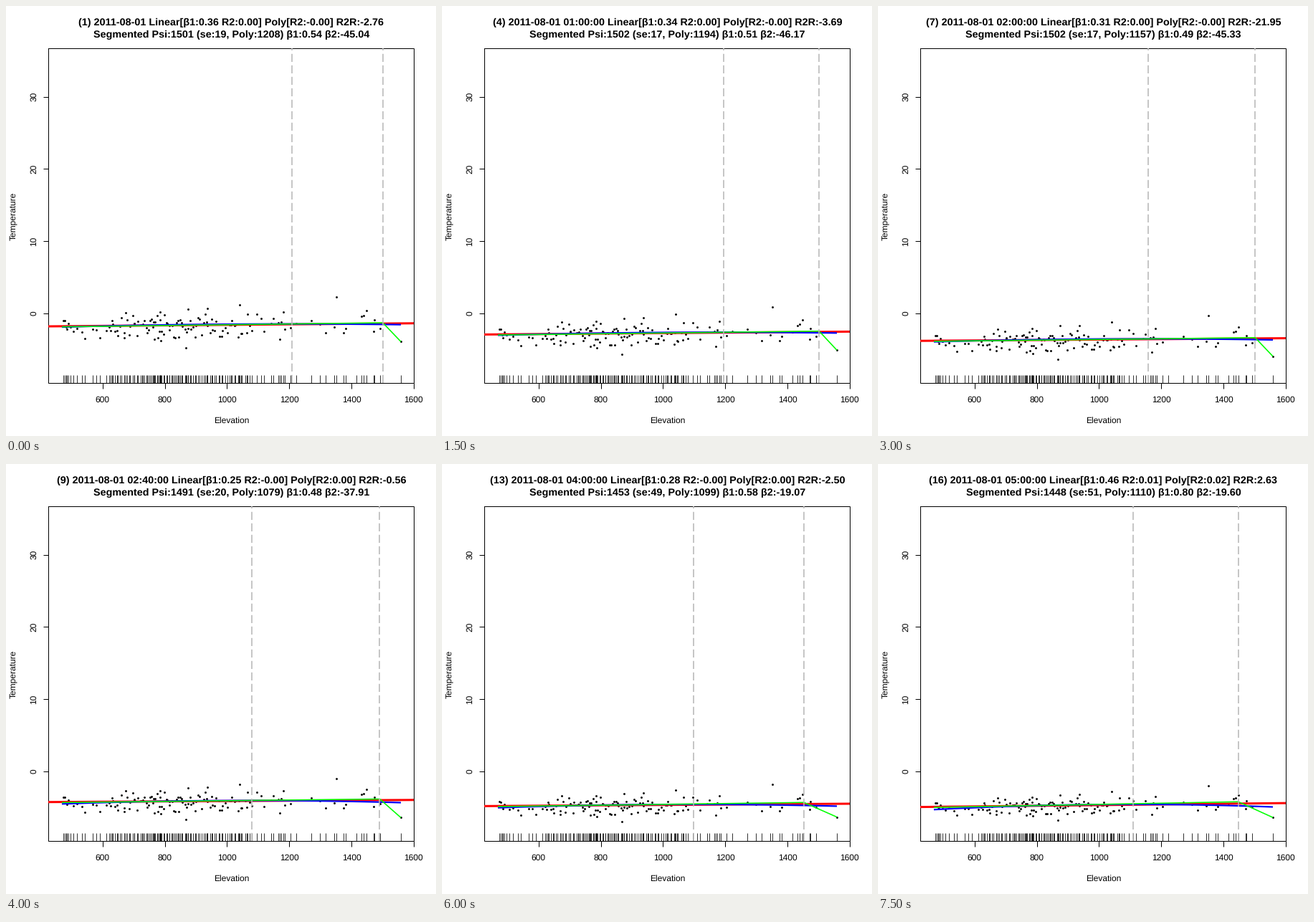
Write a matplotlib script that moves like this. It is 600 px wide and 600 px high and loops after 8 s.

```python
import numpy as np
import matplotlib.pyplot as plt
from matplotlib.animation import FuncAnimation

plt.rcParams["font.family"] = "Liberation Sans"
plt.rcParams["text.hinting"] = "none"

PX = 0.72                       # points per pixel at 100 dpi
L, R, T, B = 59, 569, 59, 526   # plot box in pixels
X_SCALE, Y_SCALE = 0.434, 10.08
X_MIN, X_MAX = 469, 1559        # elevation range of the stations
STEPS = 16

# title values at a few steps: step, slope, R2R, psi, se, peak, beta1, beta2
READINGS = np.array([
    [0, .36, -2.76, 1501, 19, 1208, .54, -45.04],
    [3, .34, -3.69, 1502, 17, 1194, .51, -46.17],
    [6, .31, -21.95, 1502, 17, 1157, .49, -45.33],
    [8, .25, -0.56, 1491, 20, 1079, .48, -37.91],
    [10, .19, 0.78, 1490, 20, 1069, .41, -36.00],
    [12, .28, -2.50, 1453, 49, 1099, .58, -19.07],
    [15, .46, 2.63, 1448, 51, 1110, .80, -19.60],
])

# stations far from the fit at the first step, in pixels
OUTLIERS = np.array([
    (110, 464), (167, 428), (207, 465), (215, 427), (216, 467), (251, 477),
    (254, 423), (281, 422), (326, 417), (382, 465), (387, 427), (461, 406),
    (471, 456), (499, 432), (503, 425), (513, 454),
])


def x_px(v):
    return 134.8 + (v - 600) * X_SCALE


def y_px(v):
    return 429 - v * Y_SCALE


def rise(slope, metres):
    """Pixels climbed for a slope in degrees per km."""
    return slope * metres / 1000 * Y_SCALE


def line_left(i):
    """The whole cloud cools and levels off: quadratic ease-out."""
    return 478.6 - 31.6 * (1 - i / (STEPS - 1)) ** 2


def fit_y(x, i, slope):
    return line_left(i) - rise(slope, (x - L) / X_SCALE)


# evenly jittered ranks mapped through the elevation distribution
rng = np.random.default_rng(5)
n = 124
rank = (np.arange(n) + rng.uniform(0, 1, n)) / n
core_x = np.round(np.interp(
    rank, [0, .05, .1, .27, .52, .67, .84, .92, 1],
    [78, 92, 140, 190, 247, 290, 342, 402, 530]))
core_res = np.clip(rng.normal(1, 8.5, n), -15, 17)

px = np.r_[core_x, OUTLIERS[:, 0], x_px(X_MAX)]
far_res = OUTLIERS[:, 1] - fit_y(OUTLIERS[:, 0], 0, READINGS[0, 1])
res = np.r_[core_res, far_res, 0]

fig = plt.figure(figsize=(6, 6), dpi=100, facecolor="white")
ax = fig.add_axes([0, 0, 1, 1])
ax.set_xlim(0, 600)
ax.set_ylim(600, 0)
ax.axis("off")


def stroke(xs, ys, color="black", width=1.0, **kw):
    kw.setdefault("solid_capstyle", "butt")
    return ax.plot(xs, ys, color=color, lw=width * PX, **kw)[0]


def label(x, y, text, size=12, **kw):
    return ax.text(x, y, text, fontsize=size * PX, ha="center",
                   va="baseline", rotation_mode="anchor", **kw)


stroke([L, R, R, L, L], [T, T, B, B, T], solid_joinstyle="miter")
for v in range(600, 1601, 200):
    stroke([x_px(v)] * 2, [B, B + 8])
    label(x_px(v), 553.2, str(v))
for v in range(0, 31, 10):
    stroke([L - 7, L], [y_px(v)] * 2)
    label(42.2, y_px(v), str(v), rotation=90)
label(314.4, 582, "Elevation")
label(13, 293, "Temperature", rotation=90)
ax.vlines(px, 515, B, color="black", lw=0.8 * PX)

dots = ax.plot(px, px, "o", color="black", ms=2.9 * PX, mew=0, zorder=3)[0]
line = stroke([L, R], [0, 0], "#ff0000", 3, zorder=4)
curve = stroke([], [], "#0000ff", 2.2, zorder=5)
bent = stroke([], [], "#00ff00", 1.6, zorder=6)
marks = [stroke([0, 0], [B, T], "#b8b8b8", 1.6, zorder=7, ls=(0, (7, 3)),
                dash_capstyle="butt") for _ in range(2)]
heads = [label(314.4, y, "", 14.4, weight="bold") for y in (27, 44.2)]

elev = np.linspace(X_MIN, X_MAX, 120)


def draw(i):
    slope, r2r, psi, se, peak, b1, b2 = [
        np.interp(i, READINGS[:, 0], col) for col in READINGS.T[1:]]
    r2 = 1.6 * (slope - 0.295) ** 3
    poly_r2 = r2r * r2

    line.set_ydata(fit_y(np.array([L, R]), i, slope))

    # parabola with the line's slope near the mean elevation
    bend = rise(slope, 1) / (2 * (peak - 980))
    top = fit_y(x_px(peak), i, slope) - 0.5
    curve.set_data(x_px(elev), top + bend * (elev - peak) ** 2)

    start = fit_y(x_px(X_MIN), i, slope) + 0.8
    knee = start - rise(b1, psi - X_MIN)
    end = knee - rise(b2, X_MAX - psi)
    bent.set_data(x_px(np.array([X_MIN, psi, X_MAX])), [start, knee, end])

    spread = 1 - 0.34 * i / (STEPS - 1)
    ys = fit_y(px, i, slope) + spread * res
    ys[-1] = end
    dots.set_ydata(ys)

    for mark, v in zip(marks, (peak, psi)):
        mark.set_xdata([x_px(v)] * 2)

    hour, minute = divmod(20 * i, 60)
    clock = f" {hour:02d}:{minute:02d}:00" if i else ""
    heads[0].set_text(f"({i + 1}) 2011-08-01{clock} Linear[β1:{slope:.2f} "
                      f"R2:{r2:.2f}] Poly[R2:{poly_r2:.2f}] R2R:{r2r:.2f}")
    heads[1].set_text(f"Segmented Psi:{psi:.0f} (se:{se:.0f}, "
                      f"Poly:{peak:.0f}) β1:{b1:.2f} β2:{b2:.2f}")
    return [dots, line, curve, bent, *marks, *heads]


anim = FuncAnimation(fig, draw, frames=STEPS, interval=500,
                     repeat=True, repeat_delay=0, blit=False)
plt.show()
```
